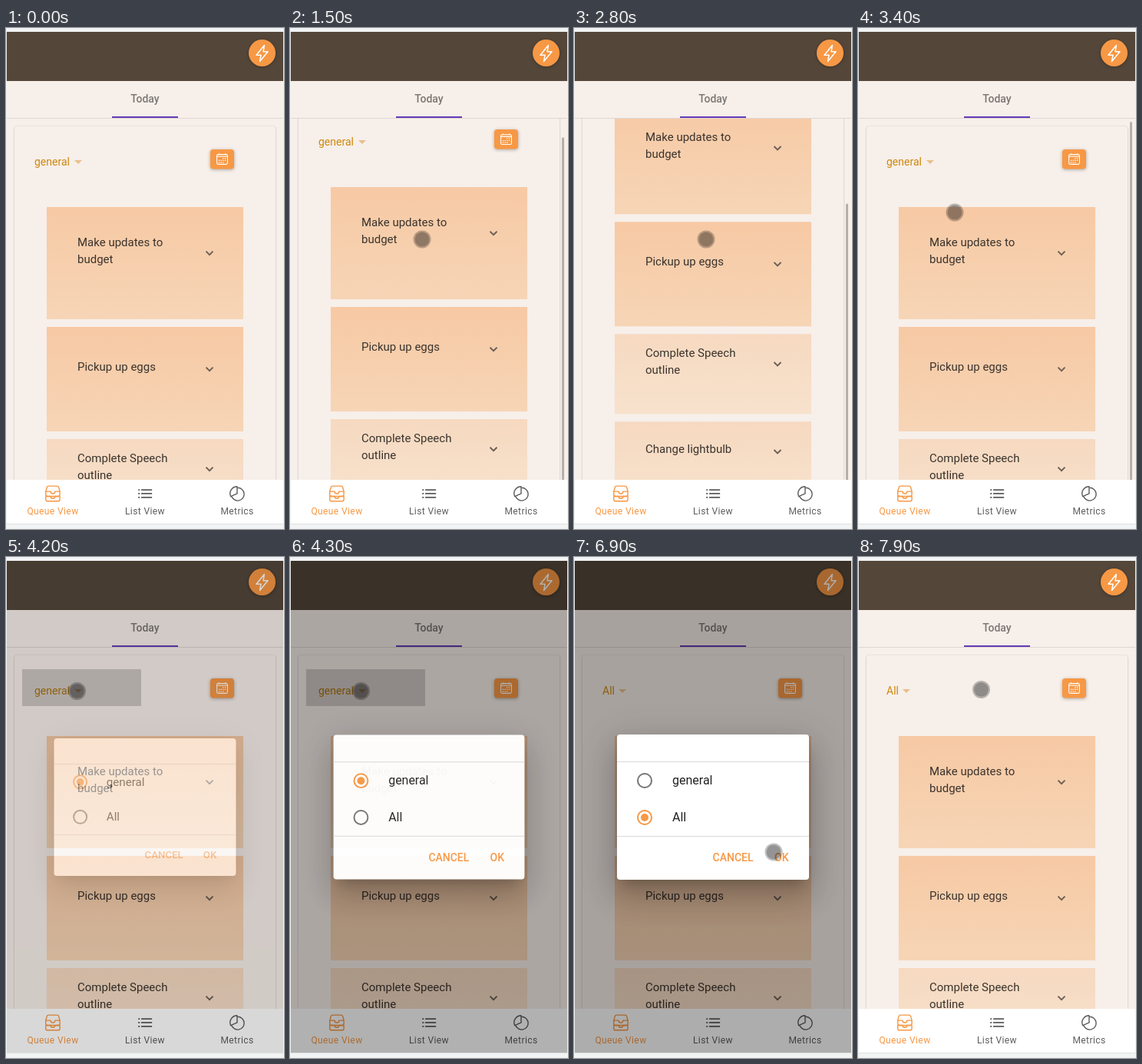
Recreate the animation shown at these times as an HTML page. Size 362 by 652 pixels, loop 8000 ms.

```html
<!DOCTYPE html>
<html lang="en">
<head>
<meta charset="utf-8">
<title>Task queue</title>
<style>
  html, body { margin: 0; width: 100%; height: 100%; overflow: hidden; background: #f1f3f4; }
  svg, .shade, .dialog, #modal, #panel { position: absolute; }
  svg, #modal, #panel { left: 0; top: 0; width: 362px; height: 652px; }
  #panel { transform-origin: 181px 325.5px; }
  text { font-family: Roboto, sans-serif; font-size: 14px; }
  .medium { font-weight: 500; }
  .task { font-size: 15px; fill: #3b332d; }
  .option { font-size: 16px; fill: #222; }
  .tab { font-size: 12px; letter-spacing: .4px; text-anchor: middle; fill: #5c5c5c; }
  .accent { fill: #f79845; }
  .line { fill: none; stroke: #fff; stroke-width: 32; stroke-linecap: round; stroke-linejoin: round; }
  .raised { filter: drop-shadow(0 1px 2px rgba(0,0,0,.3)); }
  .card { fill: #f7efea; filter: drop-shadow(0 1px 1px rgba(0,0,0,.14)) drop-shadow(0 0 1px rgba(0,0,0,.12)); }
  .shade { left: 1px; top: 5px; width: 360px; height: 640px; background: rgba(0,0,0,.32); }
  .dialog {
    left: 56px; top: 231px; width: 250px; height: 189px; border-radius: 4px; background: #fff;
    box-shadow: 0 11px 15px -7px rgba(0,0,0,.2), 0 24px 38px 3px rgba(0,0,0,.14), 0 9px 46px 8px rgba(0,0,0,.12);
  }
</style>
</head>
<body>
<svg viewBox="0 0 362 652">
  <defs>
    <clipPath id="view"><rect x="1" y="118" width="360" height="470"/></clipPath>
    <linearGradient id="strong" x2="0" y2="1">
      <stop stop-color="#f7c9a4"/><stop offset="1" stop-color="#f6d5b6"/>
    </linearGradient>
    <linearGradient id="soft" x2="0" y2="1">
      <stop stop-color="#f6d9c0"/><stop offset="1" stop-color="#f7e2cd"/>
    </linearGradient>
  </defs>
  <rect x="1" y="5" width="360" height="640" fill="#f7efea"/>

  <g clip-path="url(#view)">
    <g id="content">
      <rect class="card" x="11" y="128" width="340" height="680" rx="4"/>
      <text id="group" x="37" y="179" fill="#cd880c"></text>
      <path id="arrow" d="M0 172h10l-5 5z" fill="#e8c08c"/>
      <rect class="accent raised" x="266" y="158" width="31" height="25.5" rx="4"/>
      <g class="line" transform="translate(273 162) scale(.0332)">
        <rect x="48" y="80" width="416" height="384" rx="48"/>
        <path d="M128 48v32M384 48v32M48 160h416"/>
        <path stroke-width="48" d="M296 232h0m80 0h0M136 312h0m80 0h0m80 0h0m80 0h0M136 392h0m80 0h0m80 0h0"/>
      </g>
      <g id="tasks"></g>
    </g>
    <rect id="thumb" x="354" width="3" height="500" rx="1.5"/>
  </g>

  <rect x="1" y="5" width="360" height="64" fill="#54473a"/>
  <circle class="accent raised" cx="333.5" cy="32.5" r="17.5"/>
  <path class="line" transform="translate(321.5 21) scale(.0469)" d="M317 32 96 304h128l-32 176 224-272H288z"/>
  <text class="medium" x="181" y="97" text-anchor="middle" fill="#7c7774">Today</text>
  <rect x="1" y="117" width="360" height="1" fill="#ddd6d2"/>
  <rect x="138" y="115" width="86" height="2" fill="#673ab7"/>

  <rect x="1" y="588" width="360" height="57" fill="#fff"/>
  <rect x="1" y="645" width="360" height="1" fill="#e0e0e0"/>
  <g class="line" style="stroke:#f79845" transform="translate(49.7 594.7) scale(.044)">
    <path id="tray" d="M48 336v96a48 48 0 0 0 48 48h320a48 48 0 0 0 48-48v-96M48 336h144m128 0h144m-272 0a64 64 0 0 0 128 0"/>
    <use href="#tray" y="-144"/>
    <path d="M48 192 80 72c5-26 22-40 48-40h256c25 0 43 13 48 40l32 120"/>
  </g>
  <g class="line" style="stroke:#5c5c5c">
    <path transform="translate(169.7 594.7) scale(.044)" d="M160 144h288M160 256h288M160 368h288M72 144h16M72 256h16M72 368h16" stroke-width="40"/>
    <path transform="translate(289.7 594.7) scale(.044)" d="M256 80q8 0 16 0a192 192 0 1 1-183 251M256 48A208 208 0 0 0 66 341L256 256z"/>
  </g>
  <text class="tab" x="61" y="633" style="fill:#f79845">Queue View</text>
  <text class="tab" x="181" y="633">List View</text>
  <text class="tab" x="301" y="633">Metrics</text>
  <rect id="ripple" x="21" y="146" width="155" height="48"/>
</svg>

<div id="modal">
  <div class="shade"></div>
  <div id="panel">
    <div class="dialog"></div>
    <svg viewBox="0 0 362 652">
      <path d="M56 266.5h250M56 363.5h250" stroke="#d9d9d9"/>
      <g id="radios"></g>
      <text class="option" x="128" y="296">general</text>
      <text class="option" x="128" y="344">All</text>
      <text class="medium accent" x="180.5" y="396">CANCEL</text>
      <text class="medium accent" x="261" y="396">OK</text>
    </svg>
  </div>
</div>

<svg viewBox="0 0 362 652">
  <g id="cursor">
    <circle r="9.5" fill-opacity=".42"/>
    <circle r="10.5" fill="none" stroke="#000" stroke-width="2" stroke-opacity=".25"/>
  </g>
</svg>

<script>
const LOOP = 8000, TICK = 100;
const $ = id => document.getElementById(id);

// Progress from 0 to 1 between two times
const ramp = (time, start, end) => Math.min(1, Math.max(0, (time - start) / (end - start)));
const smooth = p => p * p * (3 - 2 * p);

// Stacks the tasks; text and chevron follow from each height
function buildTasks() {
  const tasks = [
    { height: 146, fill: 'strong', lines: ['Make updates to', 'budget'] },
    { height: 136, fill: 'strong', lines: ['Pickup up eggs'] },
    { height: 104, fill: 'soft', lines: ['Complete Speech', 'outline'] },
    { height: 104, fill: 'soft', lines: ['Change lightbulb'] }
  ];
  let top = 233;
  for (const { height, fill, lines } of tasks) {
    const middle = top + height / 2 - 16;
    const baseline = i => middle + 5 + 22 * (i - (lines.length - 1) / 2);
    $('tasks').innerHTML += `
      <rect x="53" y="${top}" width="256" height="${height}" fill="url(#${fill})"/>
      ${lines.map((line, i) => `<text class="task" x="93" y="${baseline(i)}">${line}</text>`).join('')}
      <path d="M260.5 ${middle + 0.7}l4.5 4.5 4.5-4.5" fill="none" stroke="#6b5e54" stroke-width="1.9"/>`;
    top += height + 10;
  }
}

// The pointer enters from above, then glides from stop to stop
const entry = { x: 16, y: -22 };
const glides = [
  { start: 300, end: 1000, x: 172, y: 275 },
  { start: 3300, end: 3400, x: 126, y: 240 },
  { start: 3400, end: 3700, x: 98, y: 185 },
  { start: 3800, end: 4000, x: 92.5, y: 174.5 },
  { start: 5200, end: 5600, x: 127, y: 353 },
  { start: 5600, end: 5800, x: 112, y: 342 },
  { start: 6000, end: 6100, x: 269, y: 384 },
  { start: 6200, end: 6800, x: 260, y: 384 },
  { start: 7400, end: 7500, x: 260, y: 375 },
  { start: 7600, end: 7900, x: 160.5, y: 172.5 }
];

function pointerAt(time) {
  let { x, y } = entry;
  for (const glide of glides) {
    const p = ramp(time, glide.start, glide.end);
    x += (glide.x - x) * p;
    y += (glide.y - y) * p;
  }
  return `translate(${x} ${y})`;
}

function radio(y, checked) {
  const color = checked ? '#f79845' : '#757575';
  return `<circle cx="92" cy="${y}" r="9" fill="none" stroke="${color}" stroke-width="2"/>` +
    (checked ? `<circle cx="92" cy="${y}" r="5" fill="${color}"/>` : '');
}

function draw(time) {
  const during = (start, fadeStart, fadeEnd) =>
    ramp(time, start, start + TICK) - ramp(time, fadeStart, fadeEnd);
  const wheel = (start, end, distance) => distance * smooth(ramp(time, start, end));

  $('cursor').setAttribute('transform', pointerAt(time));

  const scroll = wheel(1400, 1700, 100) + wheel(1800, 2000, 62) - wheel(2700, 3100, 162);
  $('content').setAttribute('transform', `translate(0 ${-scroll})`);
  $('thumb').setAttribute('y', 122 + scroll * .78);
  $('thumb').style.opacity = .27 * (during(1400, 2300, 2500) + during(2700, 3400, 3600));

  const opening = ramp(time, 4100, 4310);
  $('modal').style.opacity = opening - ramp(time, 6900, 7080);
  $('panel').style.transform = `scale(${.9 + .1 * opening})`;
  $('ripple').style.opacity = .17 * during(4100, 4300, 4700);

  const allChecked = time >= 6000, applied = time >= 6900;
  $('radios').innerHTML = radio(291, !allChecked) + radio(339, allChecked);
  $('group').textContent = applied ? 'All' : 'general';
  $('arrow').setAttribute('transform', `translate(${applied ? 58 : 89} 0)`);
}

buildTasks();
const start = performance.now();
function frame() {
  const time = (performance.now() - start) % LOOP;
  draw(Math.floor(time / TICK) * TICK);
  requestAnimationFrame(frame);
}
frame();
</script>
</body>
</html>
```
